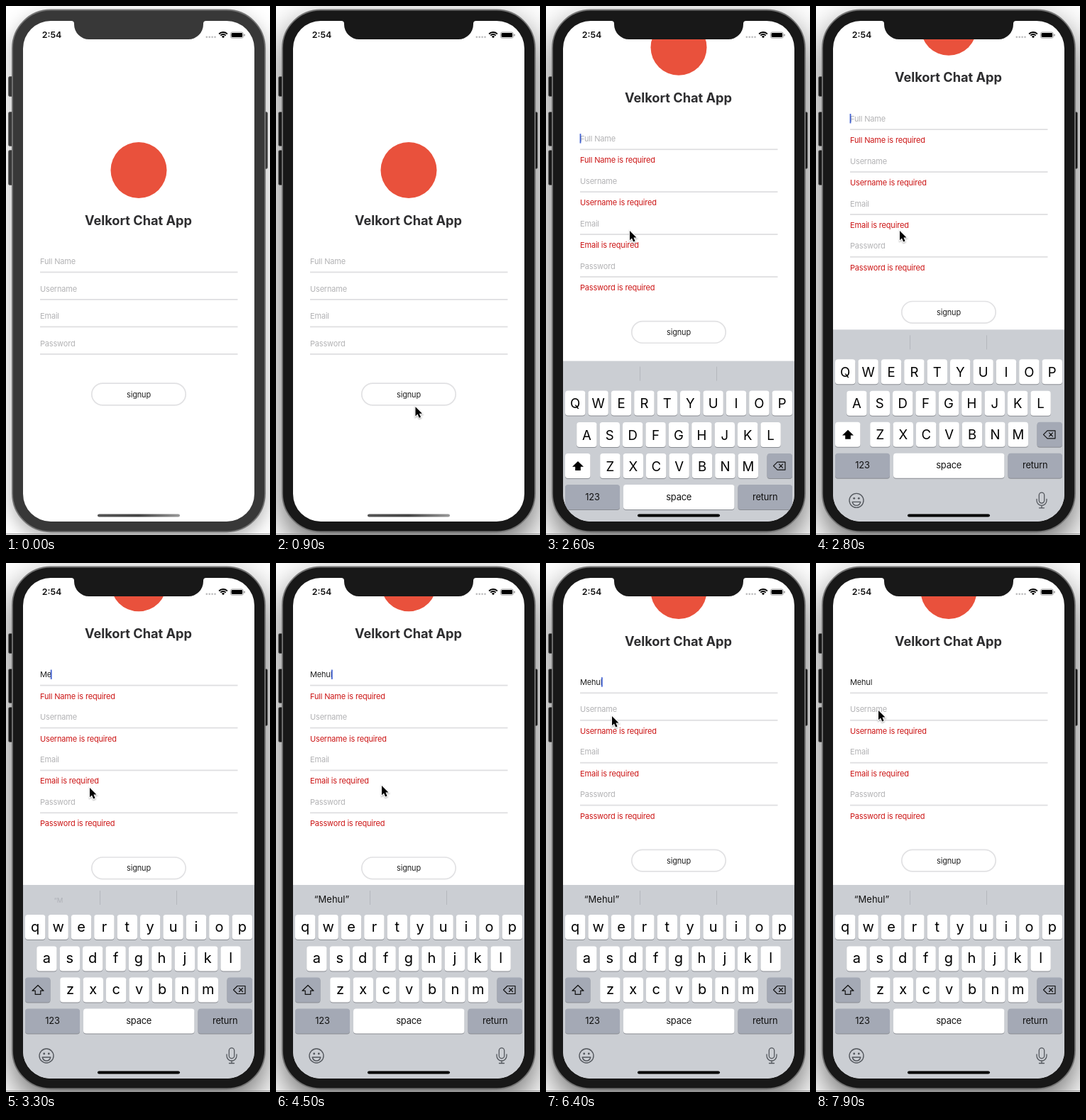
An HTML page with a canvas for the animation above (8000 ms loop, 372 px wide and 746 px high).

```html
<!DOCTYPE html>
<html lang="en">
<head>
<meta charset="utf-8">
<title>Signup form</title>
<style>
html, body { margin: 0; width: 100%; height: 100%; overflow: hidden; background: #fff; }
canvas { display: block; width: 372px; height: 746px; }
</style>
</head>
<body>
<canvas id="stage"></canvas>
<script>
const W = 372, H = 746, LOOP = 8000, STEP = 100;
const canvas = document.getElementById('stage');
const ctx = canvas.getContext('2d');
const dpr = window.devicePixelRatio || 1;
canvas.width = W * dpr;
canvas.height = H * dpr;

const FIELDS = ['Full Name', 'Username', 'Email', 'Password'];
const NAME = 'Mehul';
const TITLE = 'Velkort Chat App';
const TYPED_AT = [3100, 3300, 3600, 3800, 4100];
const ACTIVE_AT = 500, ERRORS_AT = 1200, FOCUS_AT = 2422, FIXED_AT = 5300;
const FORM_LAG = 6;
const ERROR_HEIGHT = 21.4, FIELD_PITCH = 38.5;

// time, x, y of the pointer tip
const POINTER = [
  [700, 215, 600], [1000, 190, 553], [1300, 190, 553], [1800, 118, 313],
  [2300, 118, 313], [2600, 118, 317], [4300, 118, 317], [4500, 149, 314],
  [5000, 187, 426], [5400, 187, 426], [6200, 93, 216], [6400, 93, 216],
  [7000, 89, 210], [7800, 88, 208]
];

const smooth = p => p * p * (3 - 2 * p);

function pointerAt(t) {
  if (t < POINTER[0][0]) return null;
  for (let i = 1; i < POINTER.length; i++) {
    const [t0, x0, y0] = POINTER[i - 1], [t1, x1, y1] = POINTER[i];
    if (t < t1) {
      const p = smooth((t - t0) / (t1 - t0));
      return [x0 + (x1 - x0) * p, y0 + (y1 - y0) * p];
    }
  }
  return POINTER[POINTER.length - 1].slice(1);
}

// Critically damped spring used for the keyboard slide
function slideAt(t) {
  const k = Math.max(0, t - FOCUS_AT) * 0.018;
  return 1 - (1 + k) * Math.exp(-k);
}

function box(x, y, w, h, r, fill) {
  ctx.beginPath();
  ctx.roundRect(x, y, w, h, r);
  if (fill) {
    ctx.fillStyle = fill;
    ctx.fill();
  }
}

function disc(x, y, r, fill) {
  ctx.beginPath();
  ctx.arc(x, y, r, 0, Math.PI * 2);
  ctx.fillStyle = fill;
  ctx.fill();
}

function text(s, x, y, size, color, { align = 'left', weight = 400, gap = 0 } = {}) {
  ctx.font = `${weight} ${size}px Inter, Roboto, sans-serif`;
  ctx.letterSpacing = gap + 'px';
  ctx.textAlign = align;
  ctx.textBaseline = 'alphabetic';
  ctx.fillStyle = color;
  ctx.fillText(s, x, y);
  return ctx.measureText(s).width;
}

const label = (s, x, y, color, align) => text(s, x, y + 4, 11, color, { align, gap: -0.18 });

function strokePath(d, color, width) {
  ctx.strokeStyle = color;
  ctx.lineWidth = width;
  ctx.lineCap = ctx.lineJoin = 'round';
  ctx.stroke(new Path2D(d));
}

function drawPhone(active) {
  ctx.fillStyle = '#fff';
  ctx.fillRect(0, 0, W, H);
  ctx.save();
  ctx.shadowColor = active ? 'rgba(0,0,0,.6)' : 'rgba(0,0,0,.32)';
  ctx.shadowBlur = (active ? 46 : 26) * dpr;
  ctx.shadowOffsetY = (active ? 18 : 9) * dpr;
  box(9, 5.5, 356, 736, 54, '#555');
  ctx.restore();

  const shell = active ? '#181818' : '#383838';
  const side = (x, y, w, h) => {
    box(x, y, w, h, 2, shell);
    ctx.strokeStyle = '#666';
    ctx.lineWidth = 1;
    ctx.stroke();
  };
  side(3.5, 99.5, 7, 28);
  side(3.5, 149.5, 7, 48);
  side(3.5, 203.5, 7, 49);
  side(362.5, 149.5, 6, 80);

  box(9, 5.5, 356, 736, 54, shell);
  ctx.strokeStyle = '#747474';
  ctx.lineWidth = 1.8;
  ctx.stroke();
  ctx.fillStyle = '#999';
  ctx.fillRect(0, 744, W, 1);
  return shell;
}

function drawForm(t, shift) {
  const errors = t < ERRORS_AT ? [0, 0, 0, 0] : [t < FIXED_AT ? 1 : 0, 1, 1, 1];
  const count = errors.reduce((a, b) => a + b);
  let y = 360 - count * ERROR_HEIGHT / 2 - shift;

  disc(187, y - 128.5, 39.5, '#e9513c');
  text(TITLE, 186.5, y - 51.3, 18.2, '#2d2d2f', { align: 'center', weight: 700 });

  const typed = NAME.slice(0, TYPED_AT.filter(at => t >= at).length);
  FIELDS.forEach((name, i) => {
    const value = i === 0 ? typed : '';
    const width = label(value || name, 48, y, value ? '#222' : '#b2b2b4');
    if (i === 0) drawCaret(t, value ? 48 + width - 1.2 : 47.6, y);
    ctx.fillStyle = '#dfdfe1';
    ctx.fillRect(48, y + 14.5, 278.5, 1.8);
    if (errors[i]) label(name + ' is required', 48, y + 30.4, '#cc1515');
    y += FIELD_PITCH + errors[i] * ERROR_HEIGHT;
  });

  box(120.8, y + 18.2, 132.4, 30.6, 15.3);
  ctx.strokeStyle = '#e1e1e3';
  ctx.lineWidth = 1.7;
  ctx.stroke();
  label('signup', 187, y + 33.5, '#222', 'center');
}

function drawCaret(t, x, y) {
  const phase = t % 1000;
  const hidden = t > 4700 && (phase >= 650 || phase < 100);
  if (t < FOCUS_AT || hidden) return;
  ctx.fillStyle = '#4262d2';
  ctx.fillRect(x, y - 6.7, 1.8, 13.4);
}

function drawStatus(shell) {
  ctx.fillStyle = shell;
  ctx.fill(new Path2D('M92 20V21A4 4 0 0 1 96 25V26A21 21 0 0 0 117 47H257' +
    'A21 21 0 0 0 278 26V25A4 4 0 0 1 282 21V20Z'));
  text('2:54', 64.5, 45.2, 12.4, '#111', { align: 'center', weight: 600 });
  for (let i = 0; i < 4; i++) disc(282.8 + i * 3.9, 43.8, 1.3, '#b9b9bb');

  ctx.strokeStyle = '#000';
  ctx.lineCap = 'butt';
  ctx.lineWidth = 1.9;
  for (const r of [8, 5]) {
    ctx.beginPath();
    ctx.arc(306, 45, r, -Math.PI * 0.76, -Math.PI * 0.24);
    ctx.stroke();
  }
  ctx.fillStyle = '#000';
  ctx.fill(new Path2D('M306 45.2L303.9 42.9Q306 41.3 308.1 42.9Z'));

  box(316.4, 36.9, 18, 8.4, 2.4);
  ctx.strokeStyle = '#8f8f8f';
  ctx.lineWidth = 0.8;
  ctx.stroke();
  box(317.6, 38.1, 15.6, 6, 1.4, '#000');
  box(335.4, 39.6, 1.3, 3, 0.7, '#8f8f8f');
}

function key(x, y, w, fill = '#fff') {
  box(x, y + 1, w, 35, 4, '#898c92');
  box(x, y, w, 35, 4, fill);
}

function drawKeyboard(t, top) {
  const upper = t < TYPED_AT[0];
  const gray = '#a4a9b5';
  ctx.save();
  ctx.translate(0, top);
  ctx.fillStyle = '#cbced3';
  ctx.fillRect(24, 0, 326, 300);
  ctx.fillStyle = '#b4b7bd';
  ctx.fillRect(132, 8, 1, 20);
  ctx.fillRect(240, 8, 1, 20);
  drawSuggestion(t);

  const rows = [['qwertyuiop', 27, 42], ['asdfghjkl', 43.2, 86.4], ['zxcvbnm', 76.2, 130.4]];
  for (const [letters, x0, y] of rows) {
    [...letters].forEach((c, i) => {
      const x = x0 + i * 32.4;
      key(x, y, 28.4);
      const size = upper ? 18.6 : 20;
      text(upper ? c.toUpperCase() : c, x + 14.2, y + (upper ? 24.6 : 23.6), size, '#000', { align: 'center' });
    });
  }

  key(27, 130.4, 35.5, upper ? '#fff' : gray);
  const arrow = 'M45 141.5L53 149.2H48.8V154.4H41.2V149.2H37Z';
  if (upper) {
    ctx.fillStyle = '#000';
    ctx.fill(new Path2D(arrow));
  } else {
    strokePath(arrow, '#111', 1.2);
  }

  key(311.5, 130.4, 35.5, gray);
  strokePath('M326 142.5H337V153.5H326L320.5 148ZM328.5 145.5L333.5 150.5M333.5 145.5L328.5 150.5', '#111', 1.2);

  key(27, 174.5, 77, gray);
  key(109, 174.5, 156.5);
  key(270.5, 174.5, 76.5, gray);
  for (const [s, x] of [['123', 65.5], ['space', 187.2], ['return', 308.7]]) {
    text(s, x, 196, 12.9, '#111', { align: 'center', gap: -0.2 });
  }

  const ink = '#53575d';
  strokePath('M67 241A10 10 0 1 1 47 241A10 10 0 1 1 67 241ZM51.2 243H62.8Q61.5 248 57 248Q52.5 248 51.2 243Z', ink, 1.4);
  disc(53.7, 238, 1.4, ink);
  disc(60.3, 238, 1.4, ink);
  strokePath('M314.3 233.5a3.7 3.7 0 0 1 7.4 0v7.5a3.7 3.7 0 0 1 -7.4 0Z' +
    'M311 239v2a7 7 0 0 0 14 0v-2M318 248v3.5M314.5 251.5h7', ink, 1.3);
  ctx.restore();
}

function drawSuggestion(t) {
  // The bar trails one keystroke behind at first
  const count = TYPED_AT.filter(at => t >= at + 100).length;
  if (!count) return;
  const part = NAME.slice(0, count);
  if (count === 1) {
    text('“' + part, 74, 25, 9.5, '#aeb1b7', { align: 'center' });
  } else {
    text('“' + part + '”', 78.5, 25, 13, '#111', { align: 'center' });
  }
}

function drawHomeBar(dark) {
  let fill = '#000';
  if (!dark) {
    fill = ctx.createLinearGradient(129, 0, 245, 0);
    fill.addColorStop(0, '#555');
    fill.addColorStop(0.5, '#444');
    fill.addColorStop(1, '#999');
  }
  box(129, 716.4, 116, 4.2, 2.1, fill);
}

function drawPointer(x, y) {
  ctx.save();
  ctx.translate(x, y);
  const shape = new Path2D('M0 0V13.2L3 10.4L5.2 15.6L7.6 14.6L5.4 9.5H9.5Z');
  ctx.shadowColor = 'rgba(0,0,0,.35)';
  ctx.shadowBlur = 2 * dpr;
  ctx.shadowOffsetY = dpr;
  ctx.lineJoin = 'miter';
  ctx.strokeStyle = '#fff';
  ctx.lineWidth = 2;
  ctx.stroke(shape);
  ctx.shadowColor = 'transparent';
  ctx.fillStyle = '#000';
  ctx.fill(shape);
  ctx.restore();
}

function draw(t) {
  ctx.setTransform(dpr, 0, 0, dpr, 0, 0);
  const shell = drawPhone(t >= ACTIVE_AT);
  const slide = slideAt(t);

  ctx.save();
  box(24, 21, 326, 706, 39, '#fff');
  ctx.clip();
  drawForm(t, 160 * slideAt(t - FORM_LAG));
  if (slide > 0) drawKeyboard(t, 727 - 273 * slide);
  drawHomeBar(slide > 0);
  drawStatus(shell);
  ctx.restore();

  const pointer = pointerAt(t);
  if (pointer) drawPointer(...pointer);
}

const start = performance.now();
function tick() {
  const t = (performance.now() - start) % LOOP;
  draw(Math.floor(t / STEP) * STEP);
  requestAnimationFrame(tick);
}
tick();
</script>
</body>
</html>
```
